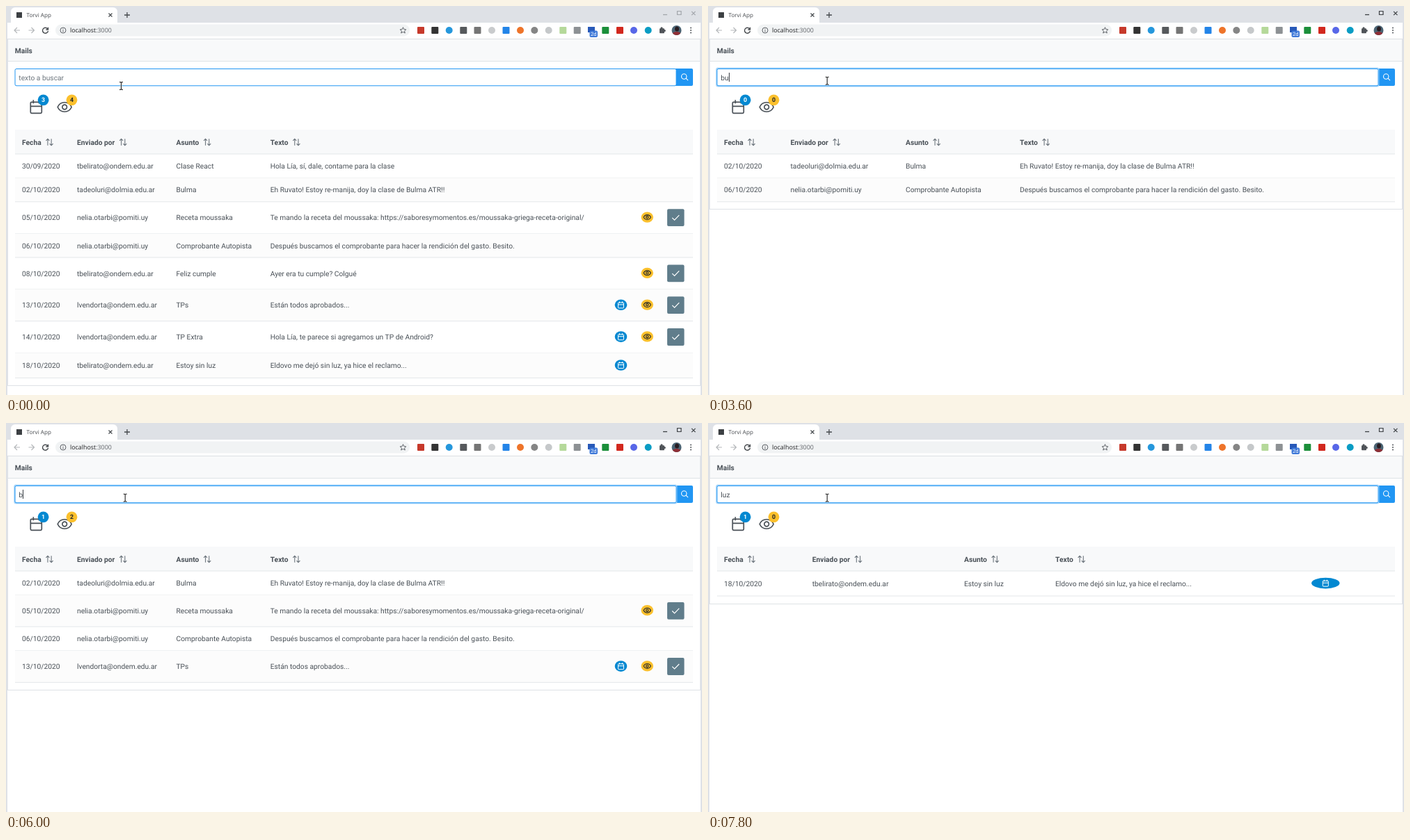
Animation, 1000 px wide and 560 px high, one loop 8000 ms. Source, as an HTML page with a canvas:

```html
<!DOCTYPE html>
<html lang="es">
<head>
<meta charset="utf-8">
<title>Torvi App</title>
<style>
  html, body { margin: 0; width: 100%; height: 100%; overflow: hidden; background: #fff; }
  canvas { display: block; width: 1000px; height: 560px; }
</style>
</head>
<body>
<canvas id="stage" width="1000" height="560"></canvas>
<script>
const ctx = document.getElementById('stage').getContext('2d');
const LOOP = 8000;
const UI = 'Roboto, sans-serif';
const CHROME = '"Open Sans", sans-serif';
const INK = '#495057', MUTED = '#6c757d', LINE = '#e4e7ea';
const BLUE = '#0288d1', AMBER = '#fbc02d', PRIMARY = '#2196f3', FRAME = '#dee1e6';

const mails = [
  { date: '30/09/2020', from: 'tbelirato@ondem.edu.ar', subject: 'Clase React', text: 'Hola Lía, sí, dale, contame para la clase' },
  { date: '02/10/2020', from: 'tadeoluri@dolmia.edu.ar', subject: 'Bulma', text: 'Eh Ruvato! Estoy re-manija, doy la clase de Bulma ATR!!' },
  { date: '05/10/2020', from: 'nelia.otarbi@pomiti.uy', subject: 'Receta moussaka', text: 'Te mando la receta del moussaka: https://saboresymomentos.es/moussaka-griega-receta-original/', unread: true },
  { date: '06/10/2020', from: 'nelia.otarbi@pomiti.uy', subject: 'Comprobante Autopista', text: 'Después buscamos el comprobante para hacer la rendición del gasto. Besito.' },
  { date: '08/10/2020', from: 'tbelirato@ondem.edu.ar', subject: 'Feliz cumple', text: 'Ayer era tu cumple? Colgué', unread: true },
  { date: '13/10/2020', from: 'lvendorta@ondem.edu.ar', subject: 'TPs', text: 'Están todos aprobados...', recent: true, unread: true },
  { date: '14/10/2020', from: 'lvendorta@ondem.edu.ar', subject: 'TP Extra', text: 'Hola Lía, te parece si agregamos un TP de Android?', recent: true, unread: true },
  { date: '18/10/2020', from: 'tbelirato@ondem.edu.ar', subject: 'Estoy sin luz', text: 'Eldovo me dejó sin luz, ya hice el reclamo...', recent: true }
];

// [start ms, query, caret visible]
const steps = [
  [0, '', 0], [1100, '', 1], [1600, '', 0],
  [2200, 'b', 1], [2300, 'bu', 1], [2900, 'bu', 0], [3600, 'bu', 1], [4200, 'bu', 0],
  [4500, 'bul', 1], [5100, 'bul', 0], [5700, 'bul', 1],
  [5900, 'bu', 1], [6000, 'b', 1], [6200, '', 1], [6900, '', 0],
  [7000, 'l', 1], [7100, 'lu', 1], [7200, 'luz', 1], [7800, 'luz', 0]
];

// The columns adapt to the rows on show
const wideColumns = [23, 102, 244.5, 379.7];
const columns = {
  bu: [23, 118.5, 284, 448],
  bul: [23, 142.5, 351, 465],
  lu: [23, 149.7, 368, 499],
  luz: [23, 149.7, 368, 499]
};

function rect(x, y, w, h, color) {
  ctx.fillStyle = color;
  ctx.fillRect(x, y, w, h);
}

function box(x, y, w, h, r, fill, stroke, width = 1) {
  ctx.beginPath();
  ctx.roundRect(x, y, w, h, r);
  if (fill) { ctx.fillStyle = fill; ctx.fill(); }
  if (stroke) { ctx.strokeStyle = stroke; ctx.lineWidth = width; ctx.stroke(); }
}

function oval(x, y, rx, ry, fill, stroke, width = 1) {
  ctx.beginPath();
  ctx.ellipse(x, y, rx, ry, 0, 0, Math.PI * 2);
  if (fill) { ctx.fillStyle = fill; ctx.fill(); }
  if (stroke) { ctx.strokeStyle = stroke; ctx.lineWidth = width; ctx.stroke(); }
}

function path(d, x, y, color, width = 1, scale = 1) {
  ctx.save();
  ctx.translate(x, y);
  ctx.scale(scale, scale);
  ctx.strokeStyle = color;
  ctx.lineWidth = width / scale;
  ctx.stroke(new Path2D(d));
  ctx.restore();
}

function label(str, x, y, color = INK, size = 10.25, weight = 400, family = UI) {
  ctx.font = `${weight} ${size}px ${family}`;
  ctx.fillStyle = color;
  ctx.fillText(str, x, y);
  return ctx.measureText(str).width;
}

function calendar(x, y, scale, color, width) {
  path('M-8-5.5Q-8-7-6.5-7H6.5Q8-7 8-5.5V7.5Q8 9 6.5 9H-6.5Q-8 9-8 7.5ZM-8-1H8M-4-10V-5M4-10V-5', x, y, color, width, scale);
}

function eye(x, y, scale, color, width) {
  path('M-10 0C-6-9 6-9 10 0C6 9-6 9-10 0ZM3.3 0A3.3 3.3 0 1 1-3.3 0A3.3 3.3 0 1 1 3.3 0', x, y, color, width, scale);
}

function drawWindow(active) {
  rect(0, 0, 1000, 560, FRAME);
  rect(2, 24, 996, 536, '#fff');
  box(7, 2, 153, 24, [6, 6, 0, 0], '#fff');
  rect(15, 9, 8, 8, '#3c4043');
  label('Torvi App', 29.5, 16, '#45494d', 8.1, 400, CHROME);
  path('M-2.5-2.5L2.5 2.5M2.5-2.5L-2.5 2.5', 150, 13, '#45494d', 1.2);
  path('M-4 0H4M0-4V4', 174, 13, '#45494d', 1.3);

  const control = active ? '#3c4043' : '#a1a5aa';
  path('M-3 0H3', 947, 12.5, control, 1.3);
  box(964.5, 7.5, 5.5, 5, 0, null, control, 1.2);
  path('M-2.7-2.7L2.7 2.7M2.7-2.7L-2.7 2.7', 987.8, 10.5, control, 1.2);

  const arrow = 'M4 0H-4M0-4L-4 0L0 4';
  path(arrow, 16, 35, '#b5b8bb', 1.2);
  path('M-4 0H4M0-4L4 0L0 4', 36.5, 35, '#b5b8bb', 1.2);
  path('M3.2-2.2A4 4 0 1 0 4 .8M4-4.3V-1H.8', 56.5, 35, '#45494d', 1.4);

  box(71, 26.5, 509, 17, 8.5, '#f1f3f4');
  oval(82, 35, 4, 4, null, '#5f6368');
  path('M0-2.2V-1.2M0-.3V2.3', 82, 35, '#5f6368', 1.1);
  const host = label('localhost', 92, 38.2, '#202124', 8.9, 400, CHROME);
  label(':3000', 92 + host, 38.2, '#5f6368', 8.9, 400, CHROME);
  path('M0-4.3L1.3-1.4L4.4-1.1L2 1L2.8 4L0 2.4L-2.8 4L-2 1L-4.4-1.1L-1.3-1.4Z', 570.5, 35, '#5f6368', 1);
  drawExtensions();
  rect(2, 47, 996, 1, '#dcdfe3');
}

function drawExtensions() {
  const squares = { 596: '#c6392b', 616.3: '#333', 657.3: '#56595c', 677.5: '#757575', 718.5: '#2384e8', 800.3: '#b5d99a', 820.7: '#8d9194', 861.3: '#1b8f3a', 882: '#d2281e' };
  const circles = { 636.7: '#2597dc', 698: '#c9cbcd', 739: '#ee742a', 759.3: '#858585', 779.7: '#c5c8ca', 902: '#5867e8', 922.7: '#0a9cc4' };
  for (const [x, color] of Object.entries(squares)) box(x - 5, 30, 10, 10, 1, color);
  for (const [x, color] of Object.entries(circles)) oval(+x, 35, 5, 5, color);

  rect(836, 30, 10, 8, '#2859b8');
  box(838.5, 35.5, 11.5, 9.5, 2, '#3d78d8');
  label('2d', 840, 43.2, '#fff', 7.5);

  box(939, 32.2, 7, 7, 1, '#505459');
  oval(942, 31.8, 1.6, 1.6, '#505459');
  oval(946.2, 35.5, 1.6, 1.6, '#505459');

  ctx.save();
  ctx.beginPath();
  ctx.arc(963.5, 35, 7, 0, Math.PI * 2);
  ctx.clip();
  rect(956, 28, 15, 14, '#4b6474');
  oval(964, 33, 3, 3.5, '#281d22');
  oval(963.5, 42, 7, 5, '#902f36');
  ctx.restore();
  for (const dy of [-3.5, 0, 3.5]) oval(984, 35 + dy, 1, 1, '#505459');
}

function drawSearch(query, caret, ring) {
  box(962, 90, 25, 25, [0, 2, 2, 0], PRIMARY);
  oval(974.2, 101.5, 3.7, 3.7, null, '#fff', 1.1);
  path('M0 0L3 3', 977, 104.2, '#fff', 1.1);
  if (ring > 0) {
    ctx.globalAlpha = ring;
    box(11.3, 88.5, 953, 28, 3, '#a6d5fa');
    ctx.globalAlpha = 1;
  }
  box(13, 90.5, 950, 24.3, 2, '#fff', PRIMARY);
  label(query || 'texto a buscar', 18.3, 106.5, query ? INK : MUTED);
  if (caret) {
    const x = Math.round(18.3 + (query ? ctx.measureText(query).width : 0));
    rect(x, 96, 1, 13, '#343a40');
  }
}

function counter(x, value, fill, color) {
  oval(x, 135.3, 7.9, 7.9, fill);
  ctx.textAlign = 'center';
  label(String(value), x, 138.4, color, 8.8, 700);
  ctx.textAlign = 'left';
}

function drawHead(cols) {
  rect(13, 178, 974, 35, '#f8f9fa');
  rect(13, 212.5, 974, 1, LINE);
  ['Fecha', 'Enviado por', 'Asunto', 'Texto'].forEach((title, i) => {
    const end = cols[i] + label(title, cols[i], 199.7, INK, 10.25, 700);
    path('M-2.5 4.7V-4.7M-5-2.2L-2.5-4.7L0-2.2M2.7-4.7V4.7M.2 2.2L2.7 4.7L5.2 2.2', end + 11.8, 196, MUTED, 1.1);
  });
}

function drawRow(mail, index, top, height, cols, alone) {
  const mid = top + height / 2;
  if (index % 2) rect(13, top, 974, height, '#fcfcfc');
  rect(13, top + height - .5, 974, 1, LINE);
  [mail.date, mail.from, mail.subject, mail.text].forEach((str, i) => label(str, cols[i], mid + 3.7));
  if (mail.recent) {
    const x = alone ? 887.3 : 883.5;
    oval(x, mid - .4, alone ? 20.2 : 8.8, 7.8, BLUE);
    calendar(x, mid - .3, .5, '#fff', 1);
  }
  if (mail.unread) {
    oval(921.3, mid - .6, 8.7, 7.6, AMBER);
    eye(921.3, mid - .6, .51, '#212529', 1.1);
    box(950, mid - 12.4, 24.5, 24.8, 2, '#607d8b');
    path('M-5 .2L-1.7 3.5L5-3.5', 962.2, mid, '#fff', 1.2);
  }
}

function drawTable(query) {
  const shown = mails.filter(m => `${m.subject} ${m.text}`.toLowerCase().includes(query));
  const cols = columns[query] || wideColumns;
  calendar(43.3, 145.3, 1, INK, 1.7);
  eye(84.2, 145.5, 1, INK, 1.7);
  counter(53.6, shown.filter(m => m.recent).length, BLUE, '#fff');
  counter(94.5, shown.filter(m => m.unread).length, AMBER, '#212529');
  drawHead(cols);
  let top = 213;
  shown.forEach((mail, i) => {
    const height = mail.unread ? 45.8 : mail.recent ? 36 : 34.4;
    drawRow(mail, i, top, height, cols, shown.length === 1);
    top += height;
  });
  const bottom = Math.round(top + 10.6);
  rect(2, 48, 1, bottom - 48, '#dee2e6');
  rect(997, 48, 1, bottom - 48, '#dee2e6');
  rect(2, bottom, 996, 1, '#dee2e6');
}

function drawPointer(progress) {
  const x = 165.5 + 5.7 * progress, y = 115 - 7.3 * progress;
  const beam = 'M-2.5-5.5H-1L0-4.5L1-5.5H2.5M0-4.5V4.5M-2.5 5.5H-1L0 4.5L1 5.5H2.5';
  path(beam, x, y, '#fff', 2);
  path(beam, x, y, '#222', 1.1);
}

function draw(ms) {
  const tick = Math.floor(ms / 100);
  const [, query, caret] = steps.findLast(step => step[0] <= ms);
  drawWindow(tick >= 10);
  rect(2, 48, 996, 31, '#f8f9fa');
  rect(2, 79, 996, 1, '#dee2e6');
  label('Mails', 12.7, 67.6, INK, 10.25, 700);
  drawSearch(query, caret, Math.min(1, Math.max(0, (tick - 9) / 3)));
  drawTable(query);
  drawPointer(Math.min(1, tick / 7));
}

ctx.textRendering = 'geometricPrecision';
const start = performance.now();
function loop() {
  draw((performance.now() - start) % LOOP);
  requestAnimationFrame(loop);
}
loop();
</script>
</body>
</html>
```
